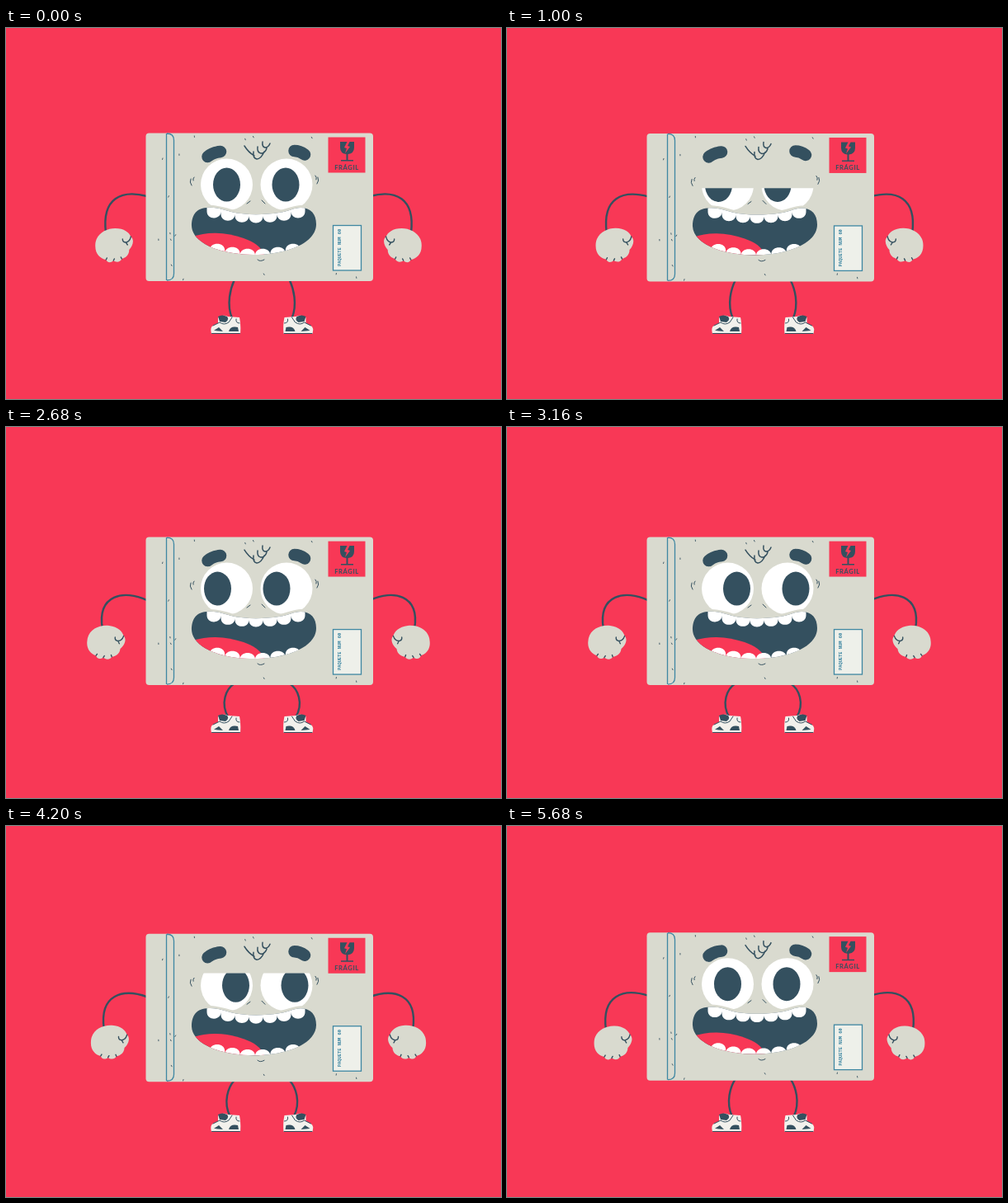
An HTML page that plays this animation: 600 px wide and 450 px high, repeating every 5.72 s.

```html
<!DOCTYPE html>
<html lang="es">
<head>
<meta charset="utf-8">
<title>Parcel character</title>
<style>
  html, body { margin: 0; width: 100%; height: 100%; overflow: hidden; background: #f83856; }
  svg { display: block; width: 100%; height: 100%; }
  .line { fill: none; stroke: #34505f; stroke-linecap: round; stroke-linejoin: round; }
  .blue { fill: none; stroke: #3f87a2; stroke-width: 1.3; }
  .dark { fill: #34505f; }
  .card { fill: #d9dacf; }
  .red { fill: #f83856; }
  .white { fill: #fff; }
</style>
</head>
<body>
<svg viewBox="0 0 600 450" preserveAspectRatio="xMidYMid slice">
  <defs>
    <path id="mouthShape" d="M243 218C229 219 225 229 225 240C226 262 262 275 300 275C340 275 376 261 376 238C376 226 370 218 357 218C349 218 344 222 331 224C311 227 290 227 273 223C262 220 255 217 243 218Z"/>
    <clipPath id="mouthClip"><use href="#mouthShape"/></clipPath>
    <clipPath id="lidClip"><rect id="lid" x="220" y="150" width="170" height="90"/></clipPath>
    <g id="hand">
      <path class="card" d="M-23 1C-24-13-11-21 1-21C12-21 18-16 20-11C25-7 22 1 18 5C18 12 13 15 9 16C7 21 1 20-1 18C-5 22-9 20-10 17C-17 16-23 10-23 1Z"/>
      <path class="line" stroke-width="1.4" d="M10-8Q10-4 14-4Q19-5 20-11M14-4L16-1M-10 17L-9 15M-1 18L0 16M9 16L8 14"/>
    </g>
    <g id="shoe">
      <path fill="#f2f1ec" d="M257 351Q263 347 269 350L283 351Q285 360 284 371H249Q247 363 251 361L257 358Z"/>
      <path class="dark" d="M257 350Q262 347 268 350Q271 354 266 357L259 356ZM270 368Q272 361 281 363L282 368ZM252 367L258 363L263 368Z"/>
      <path class="line" stroke-width="1" d="M249.500 370.500H283.500M251 361L259 357Q264 361 270 357L274 351M279 353Q278 358 283 358"/>
    </g>
  </defs>

  <rect class="red" width="600" height="450"/>

  <g class="line" stroke-width="2.4">
    <path id="legL"/><path id="legR"/>
    <path id="armL"/><path id="armR"/>
  </g>
  <use href="#shoe"/>
  <use href="#shoe" transform="translate(620.5 0) scale(-1 1)"/>
  <use href="#hand" id="handL"/>
  <use href="#hand" id="handR"/>

  <g id="box">
    <rect class="card" x="169.500" y="127.500" width="275.500" height="179.500" rx="4"/>
    <path class="blue" d="M194.500 128V306M195 128Q203.500 128 203.500 136V298Q203.500 306 195 306"/>
    <path id="flecks" class="line" stroke-width=".9"/>

    <rect class="red" x="390.500" y="132.500" width="45" height="43"/>
    <path class="dark" d="M405 138H422V145Q422 152 414.500 153V160H421V161.500H406V160H412.500V153Q405 152 405 145Z"/>
    <path class="red" d="M414 137L410 145L413 146L411 152L417 144L414 143L417 137Z"/>
    <text class="dark" x="413" y="171.700" text-anchor="middle" font-family="Lato, 'Open Sans', sans-serif" font-weight="700" font-size="7.600" letter-spacing=".6">FRÁGIL</text>

    <rect class="blue" x="396.500" y="239.500" width="34" height="54.500" style="fill:#eef0ea"/>
    <text transform="translate(406 289) rotate(-90)" fill="#3f87a2" font-family="'Noto Sans Mono', monospace" font-weight="700" font-size="5.400">PAQUETE NUM 60</text>

    <g clip-path="url(#lidClip)">
      <g class="white">
        <circle cx="267.500" cy="190" r="31.500"/>
        <circle cx="340" cy="190" r="31.500"/>
      </g>
      <g id="pupils" class="dark">
        <ellipse cx="267.500" cy="190" rx="16.500" ry="20.500"/>
        <ellipse cx="339" cy="190" rx="16.500" ry="20.500"/>
      </g>
    </g>

    <path class="line" stroke-width="14.500" d="M244.500 156Q250 151 260 150M349.500 149Q356 149 362 153.500"/>
    <path class="line" stroke-width="1.500" d="M289 143Q294 151 301 155M300 150q-1 8 4 9q5 0 9-9M305 144q-1 7 4 8q5 0 7-6M311 138q-1 6 3 7q4 0 6-5"/>
    <path class="line" stroke-width="1" d="M224 183Q222 187 225 191M228 181Q226 183 227 185M375 179Q377 181 376 184M378 181Q380 185 377 189M292 213L296 210M310 209L314 213M305 281Q308 284 313 281"/>

    <use href="#mouthShape" class="card" stroke="#d9dacf" stroke-width="6"/>
    <use href="#mouthShape" class="dark"/>
    <g clip-path="url(#mouthClip)">
      <path class="red" d="M224 254C244 246 268 248 288 255C302 260 311 266 315 280H224Z"/>
      <path id="teeth" class="white"/>
    </g>
  </g>
</svg>
<script>
  const LOOP = 5720, STEP = 40, BOUNCE = 480;
  const $ = id => document.getElementById(id);
  const set = (id, name, value) => $(id).setAttribute(name, value);
  const mix = (a, b, k) => a + (b - a) * k;

  // A row of rounded teeth whose tips follow a shallow arc
  function teeth(count, first, gap, tip, bend, dir) {
    const half = gap / 2, middle = first + gap * (count - 1) / 2;
    return Array.from({ length: count }, (_, i) => {
      const x = first + gap * i;
      const y = tip - bend * ((x - middle) / (middle - first)) ** 2;
      const l = x - half, r = x + half, side = y + dir * 8, root = y + dir * 24;
      return `M${l} ${root}V${side}C${l} ${y - dir * 2.5} ${r} ${y - dir * 2.5} ${r} ${side}V${root}Z`;
    }).join("");
  }
  set("teeth", "d", teeth(7, 252, 17, 236.5, 6, -1) + teeth(6, 256, 18.4, 268, 6.5, 1));

  // Paper specks, kept to the margins around the face
  let seed = 7;
  const random = () => (seed = seed * 16807 % 2147483647) / 2147483647;
  let specks = "";
  for (let i = 0; i < 16; i++) {
    const x = i % 2 ? mix(176, 218, random()) : mix(215, 442, random());
    const y = i % 2 ? mix(132, 302, random()) : i % 4 ? mix(129, 136, random()) : mix(295, 305, random());
    specks += `M${x} ${y}l${mix(-1, 1, random())} 1.5`;
  }
  set("flecks", "d", specks);

  // Eased 0 to 1 over 240 ms from the given start
  function ramp(t, from) {
    const k = Math.min(1, Math.max(0, (t - from) / 240));
    return k * k * (3 - 2 * k);
  }
  const gaze = t => 11 * (2 * ramp(t, 2860) - ramp(t, 360) - ramp(t, 5200));
  const lids = t => ramp(t, 560) - ramp(t, 1440) + ramp(t, 4080) - ramp(t, 5000);

  // Draws a curve on the left and its mirror image on the right
  function limbs(name, axis, points) {
    const curve = list => `M${list[0]}C${list.slice(1).join(" ")}`;
    set(name + "L", "d", curve(points.map(([x, y]) => `${x} ${y}`)));
    set(name + "R", "d", curve(points.map(([x, y]) => `${axis - x} ${y}`)));
  }

  function draw(t) {
    const p = (1 - Math.cos(t / BOUNCE * 2 * Math.PI)) / 2;
    const drop = 6.5 * p;
    set("box", "transform", `translate(0 ${drop})`);

    limbs("arm", 612, [[171, 204 + drop], [140 + 3 * p, 196 + p], [116 - 6 * p, 206 - 3 * p], [121 - 4.5 * p, 248 - 4 * p]]);
    limbs("leg", 620.5, [[277, 305 + drop], [272 - 6 * p, 316 + 2 * p], [267 - 8 * p, 335], [274 - 5 * p, 352]]);

    const x = mix(131.3, 120.6, p), y = mix(264, 261.5, p), turn = `rotate(${8 * p})`;
    set("handL", "transform", `translate(${x} ${y}) ${turn}`);
    set("handR", "transform", `translate(${612 - x} ${y}) scale(-1 1) ${turn}`);

    set("pupils", "transform", `translate(${gaze(t)} 0)`);
    set("lid", "y", mix(157, 193.7, lids(t)));
  }

  const start = performance.now();
  function tick(now) {
    const t = Math.max(0, now - start) % LOOP;
    draw(Math.floor(t / STEP) * STEP);
    requestAnimationFrame(tick);
  }
  draw(0);
  requestAnimationFrame(tick);
</script>
</body>
</html>
```
